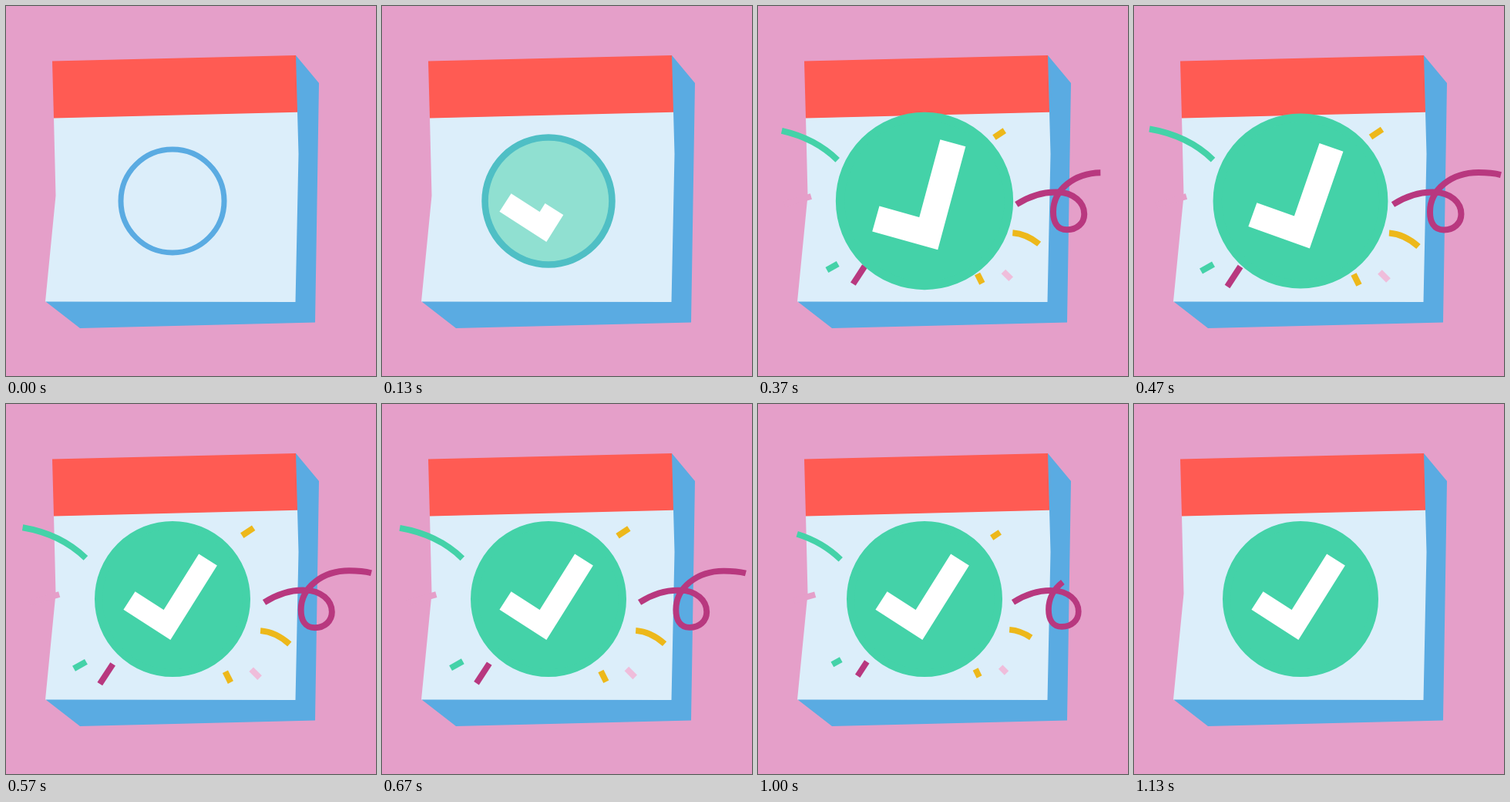
Animation of 480x480 px, one loop 3030 ms. Source, as an HTML page:

```html
<!DOCTYPE html>
<html lang="en">
<head>
<meta charset="utf-8">
<title>Calendar check</title>
<style>
  html, body { margin: 0; height: 100%; overflow: hidden; background: #e59fc9; }
  svg { display: block; width: 100%; height: 100%; }
</style>
</head>
<body>
<svg viewBox="0 0 480 480">
  <path fill="#5aabe2" d="M376 64 406 100 401 410.5 96 418 51.5 383.5 200 300Z"/>
  <path fill="#dceefa" d="M62 145 378 137 379.5 192 375.5 384 51 383.5 64.5 246Z"/>
  <path fill="#ff5b53" d="M60 71.5 376 64 378 137.7 62 145.5Z"/>
  <g id="confetti" fill="none" stroke-width="8">
    <path stroke="#44d2a8" d="M102.5 199.5Q70 168 20 159.5"/>
    <path stroke="#44d2a8" d="M103 335 87 344"/>
    <path stroke="#b8387f" d="M138 338 121 364"/>
    <path stroke="#b8387f" d="M336 257.5C354 246 372 241 389 241.5C411 242 424.5 255 424.5 270C424.5 282 415 290.5 402 290.5C389 290.5 384 280 384 267C384 238 412 216 447 216C457 216 466 216.5 476 219"/>
    <path stroke="#edb81a" d="M307 170 322 160"/>
    <path stroke="#edb81a" d="M331 294.5Q351 296 369 312"/>
    <path stroke="#edb81a" d="M285 348 292 362"/>
    <path stroke="#efbddb" d="M319 345 330 356"/>
    <path stroke="#e59fc9" d="M68 247 29 258"/>
  </g>
  <circle id="disc" r="96" stroke-width="10"/>
  <path id="check" pathLength="1" fill="none" stroke="#fff" stroke-width="28" d="M160 255 209 286.5 262 202"/>
</svg>
<script>
const LOOP = 3030, LAST = 34;
const $ = id => document.getElementById(id);
const disc = $('disc'), check = $('check'), confetti = $('confetti');
const pieces = [...confetti.children];
pieces.forEach(p => p.setAttribute('pathLength', 1));

const ramp = (f, a, b) => Math.min(1, Math.max(0, (f - a) / (b - a)));
const smooth = (f, a, b) => { const t = ramp(f, a, b); return t * t * (3 - 2 * t); };
const mix = (a, b, t) => `color-mix(in srgb, ${b} ${t * 100}%, ${a})`;
const trim = (el, t) => {
  el.setAttribute('stroke-dasharray', t < 1 ? `${t} 2` : 'none');
  el.setAttribute('visibility', t > 0 ? 'visible' : 'hidden');
};
const about = (x, y, ops) => `translate(${x} ${y}) ${ops} translate(${-x} ${-y})`;

function draw(ms) {
  // the motion advances at 30 steps per second, then rests
  const f = Math.min(LAST, Math.floor((ms + 4) * 0.03));

  const settle = smooth(f, 12.2, 17);
  const radius = 70.5 + 48.7 * ramp(f, 0, 12) - 18.2 * settle;
  const tint = ramp(f, 0, 8);
  disc.setAttribute('transform', `translate(216 253) scale(${radius / 101})`);
  disc.style.fill = mix('#dceefa', '#44d2a8', tint);
  disc.style.stroke = mix('#5aabe2', '#44d2a8', tint);

  const swing = smooth(f, 7, 12) * (1 - settle);
  check.setAttribute('transform', about(216, 249, `rotate(${-19 * swing}) scale(${1 + 0.245 * swing})`));
  trim(check, ramp(f, 0, 7.4));

  const spread = 0.95 + 0.055 * ramp(f, 7, 12) - 0.0026 * Math.max(0, f - 12);
  confetti.setAttribute('transform', about(216, 253, `scale(${spread})`));
  const shown = smooth(f, 7, 12) - smooth(f, 28, LAST);
  pieces.forEach(p => trim(p, shown));
}

const start = performance.now();
function tick() {
  draw((performance.now() - start) % LOOP);
  requestAnimationFrame(tick);
}
tick();
</script>
</body>
</html>
```
